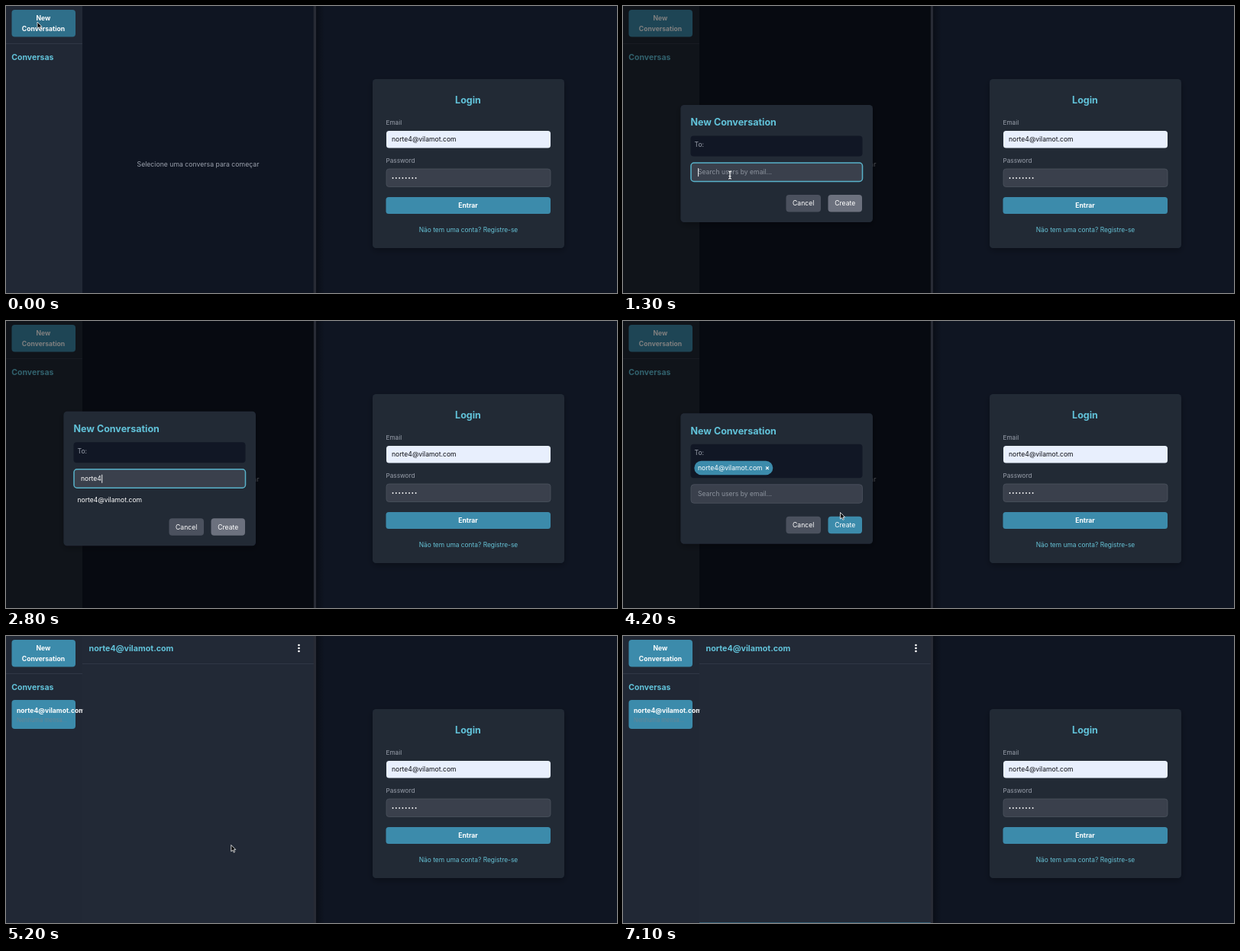
Animation, 800 px wide and 377 px high, one loop 8000 ms. Source, as an HTML page:

```html
<!DOCTYPE html>
<html lang="pt">
<head>
<meta charset="utf-8">
<title>New Conversation</title>
<style>
  html, body { margin: 0; width: 100%; height: 100%; overflow: hidden; background: #0f1522; }
  svg { display: block; width: 100vw; height: 100vh; }
  text { font: 8.6px Inter, "Liberation Sans", sans-serif; fill: #fff; white-space: pre; }
  .b { font-weight: 700; }
  .h { font-weight: 700; fill: #62c3da; }
  .g { fill: #9ca2ae; }
  .m { text-anchor: middle; }
  .blue { fill: #3c8bab; }
  .box { fill: #222936; }
  .field { fill: #3a404c; stroke: #4c535f; stroke-width: .8; }
  .line { stroke: #303746; }
  .hint { fill: #8d939e; }
</style>
</head>
<body>
<svg viewBox="0 0 800 377">
  <defs>
    <linearGradient id="edge"><stop stop-color="#0a0e17"/><stop offset="1" stop-color="#0f1522"/></linearGradient>
    <filter id="shade" x="-10%" y="-10%" width="120%" height="125%">
      <feDropShadow dx="0" dy="3" stdDeviation="4" flood-opacity=".3"/>
    </filter>
    <clipPath id="side"><path d="M0 0H100.500V377H0Z"/></clipPath>
  </defs>
  <rect width="800" height="377" fill="#0f1522"/>
  <rect x="406" width="11" height="377" fill="url(#edge)"/>

  <!-- login -->
  <rect x="480" y="96" width="251" height="222" rx="4.500" class="box" filter="url(#shade)"/>
  <text x="605" y="128" class="h m" style="font-size:12.500px">Login</text>
  <text x="497.500" y="155.500" class="g" style="font-size:8.200px">Email</text>
  <rect x="498" y="164" width="215" height="22.500" rx="3.500" fill="#e8effd"/>
  <text x="505" y="178.300" class="mail" style="fill:#0b0d12"></text>
  <text x="497.500" y="206" class="g" style="font-size:8.200px">Password</text>
  <rect x="498" y="214" width="215" height="23.500" rx="3.500" class="field"/>
  <path d="M506.500 226h31" stroke="#fff" stroke-width="1.800" stroke-linecap="round" stroke-dasharray="0 4.300"/>
  <rect x="497.500" y="251" width="215.500" height="22" rx="3.500" class="blue"/>
  <text x="605" y="265.200" class="b m">Entrar</text>
  <text x="605.500" y="297" class="m" style="fill:#66c2d6;font-size:8.400px">Não tem uma conta? Registre-se</text>

  <!-- left window -->
  <text id="empty" x="251.500" y="210.500" class="g m" style="font-size:8.700px">Selecione uma conversa para começar</text>
  <g id="chat">
    <rect x="100" width="304" height="377" class="box"/>
    <path d="M100 36.500H403" class="line"/>
    <text x="108.500" y="20.200" class="h mail" style="font-size:10.700px"></text>
    <path d="M383.500 12v8.100" stroke="#fff" stroke-width="2.700" stroke-linecap="round" stroke-dasharray="0 4"/>
    <path id="foot" d="M100 376.500H403" stroke="#315a70"/>
  </g>
  <rect width="100" height="377" fill="#212835"/>
  <rect id="new" x="7.500" y="5" width="83.500" height="35.500" rx="4"/>
  <text x="49" y="19.300" class="b m">New</text>
  <text x="49" y="32.700" class="b m">Conversation</text>
  <path d="M0 49.500H100" class="line"/>
  <text x="7.300" y="71.200" class="h" style="font-size:10.500px">Conversas</text>
  <g id="item" clip-path="url(#side)">
    <rect x="7.500" y="84" width="83.500" height="38" rx="4" class="blue"/>
    <text x="14" y="100.700" class="b mail"></text>
    <text x="14" y="112.700" style="fill:#688594;font-size:7.500px">Nenhuma mensa...</text>
  </g>
  <rect x="402.700" width="3.300" height="377" fill="#282b35"/>

  <!-- dialog -->
  <g id="dialog">
    <rect width="403" height="377" opacity=".5"/>
    <g id="panel">
      <rect id="card" x="75.500" width="251.500" rx="4.500" class="box" filter="url(#shade)"/>
      <text x="88.500" y="27.300" class="h" style="font-size:12.500px">New Conversation</text>
      <rect id="to" x="88.500" y="40.500" width="225" rx="4" fill="#111725"/>
      <text x="93.500" y="55" class="g">To:</text>
      <g id="chip">
        <rect x="93.300" y="62.500" width="103" height="18.500" rx="9.250" class="blue"/>
        <text x="98" y="75" class="mail"></text>
        <text x="189" y="75" class="b m">×</text>
      </g>
      <g id="search">
        <rect id="field" x="89" width="224.500" height="24.500" rx="4" class="field"/>
        <text id="query" x="98" y="15.400"></text>
        <rect id="caret" y="7" width=".9" height="11" fill="#fff"/>
        <text class="hit" x="93.500" y="43.700"></text>
        <text class="hit" x="93.500" y="66.200"></text>
        <text class="hit" x="93.500" y="88.700"></text>
      </g>
      <g id="actions">
        <rect x="213.500" width="45.500" height="22.500" rx="4" fill="#4b515e"/>
        <text x="236.200" y="14.300" class="m">Cancel</text>
        <rect id="create" x="268.500" width="44.500" height="22.500" rx="4"/>
        <text x="290.700" y="14.300" class="m">Create</text>
      </g>
    </g>
  </g>

  <!-- pointer shapes -->
  <g id="pointer" stroke-linejoin="round">
    <path id="arrow" d="M0 0V8.500L2 6.700 3.400 9.800 4.800 9.200 3.500 6.200H6.100Z" fill="#000" stroke="#fff" stroke-width=".8"/>
    <g id="beam" fill="none"><path d="M-2-5Q0-5 0-3.500V3.500Q0 5-2 5M2-5Q0-5 0-3.500M0 3.500Q0 5 2 5M-1.500 1.500H1.500" stroke="#fff" stroke-width="1.100"/></g>
    <path id="hand" d="M0 0Q1-.8 1.700.2L2.600 3Q5.800 3 6 4.800L5.700 7.500 4.900 9.300H1.400L-1.200 6.300Q-1.500 5 0 5.400L1 6Z" fill="#fff" stroke="#000" stroke-width=".7"/>
  </g>
</svg>
<script>
const $ = id => document.getElementById(id);
const MAIL = "norte4@vilamot.com";
const LOOP = 8000, STEP = 100;
const OPEN = 300, FOCUS = 1200, TYPE = 2000, LAST_KEY = 2700, PICK = 3400, DONE = 5200;

// time, x, y of the pointer
const path = [[0, 41, 21], [300, 41, 21], [1000, 140, 222], [2900, 140, 222], [3300, 152, 235],
  [3600, 152, 235], [4200, 284.5, 251.5], [4600, 294.8, 274.5], [5500, 294.8, 274.5],
  [6200, 232, 366], [6300, 228, 380]];

document.querySelectorAll(".mail").forEach(e => e.textContent = MAIL);

const show = (id, on) => $(id).style.display = on ? "" : "none";
const fill = (id, color) => $(id).setAttribute("fill", color);
const move = (id, x, y) => $(id).setAttribute("transform", `translate(${x} ${y})`);

function pointerAt(t) {
  const i = path.findIndex(p => p[0] > t);
  if (i < 0) return path.at(-1).slice(1);
  const [t0, x0, y0] = path[i - 1], [t1, x1, y1] = path[i];
  const u = (t - t0) / (t1 - t0), k = u * u * (3 - 2 * u);
  return [x0 + (x1 - x0) * k, y0 + (y1 - y0) * k];
}

function drawDialog(t) {
  const picked = t >= PICK;
  const keys = t < TYPE || picked ? 0 : t >= LAST_KEY ? 6 : Math.min(5, (t - TYPE) / 100 + 1);
  const hits = picked || t < 2500 ? [] : t < 2800 ? ["norte2" + MAIL.slice(6), MAIL, "norte7" + MAIL.slice(6)] : [MAIL];
  const focused = t >= FOCUS && !picked;

  const toHeight = picked ? 44.5 : 27;
  const searchY = toHeight + 49;
  const actionsY = searchY + 42 + hits.length * 22.5;
  const height = actionsY + 36;
  move("panel", 0, 207 - height / 2);
  move("search", 0, searchY);
  move("actions", 0, actionsY);
  $("card").setAttribute("height", height);
  $("to").setAttribute("height", toHeight);
  show("chip", picked);

  const query = $("query");
  query.textContent = keys ? MAIL.slice(0, keys) : "Search users by email...";
  query.setAttribute("class", keys ? "" : "hint");
  $("caret").setAttribute("x", keys ? 98.4 + query.getComputedTextLength() : 98.2);
  show("caret", focused && (t < 1800 || t >= TYPE));
  $("field").style.cssText = focused ? "stroke:#58b2ca;stroke-width:1.5" : "";
  document.querySelectorAll(".hit").forEach((e, i) => e.textContent = hits[i] || "");
  fill("create", !picked ? "#6c717e" : t < 4600 ? "#3c8bab" : t < 4700 ? "#367d9a" : "#306e88");
}

function draw(t) {
  const open = t >= OPEN && t < DONE, done = t >= DONE;
  show("dialog", open);
  show("chat", done);
  show("item", done);
  show("empty", !done);
  show("foot", t >= 6000);
  fill("new", t < OPEN ? "#2f6f8a" : "#3c8bab");
  if (open) drawDialog(t);

  const [x, y] = pointerAt(t);
  const beam = t >= 1000 && t < 3000, hand = t >= 4600 && t < DONE;
  move("pointer", x, y);
  show("pointer", t < 6300 && !(t >= TYPE && t < 3000));
  show("beam", beam);
  show("hand", hand);
  show("arrow", !beam && !hand);
}

function frame() {
  draw(Math.floor(performance.now() % LOOP / STEP) * STEP);
  requestAnimationFrame(frame);
}
frame();
</script>
</body>
</html>
```
